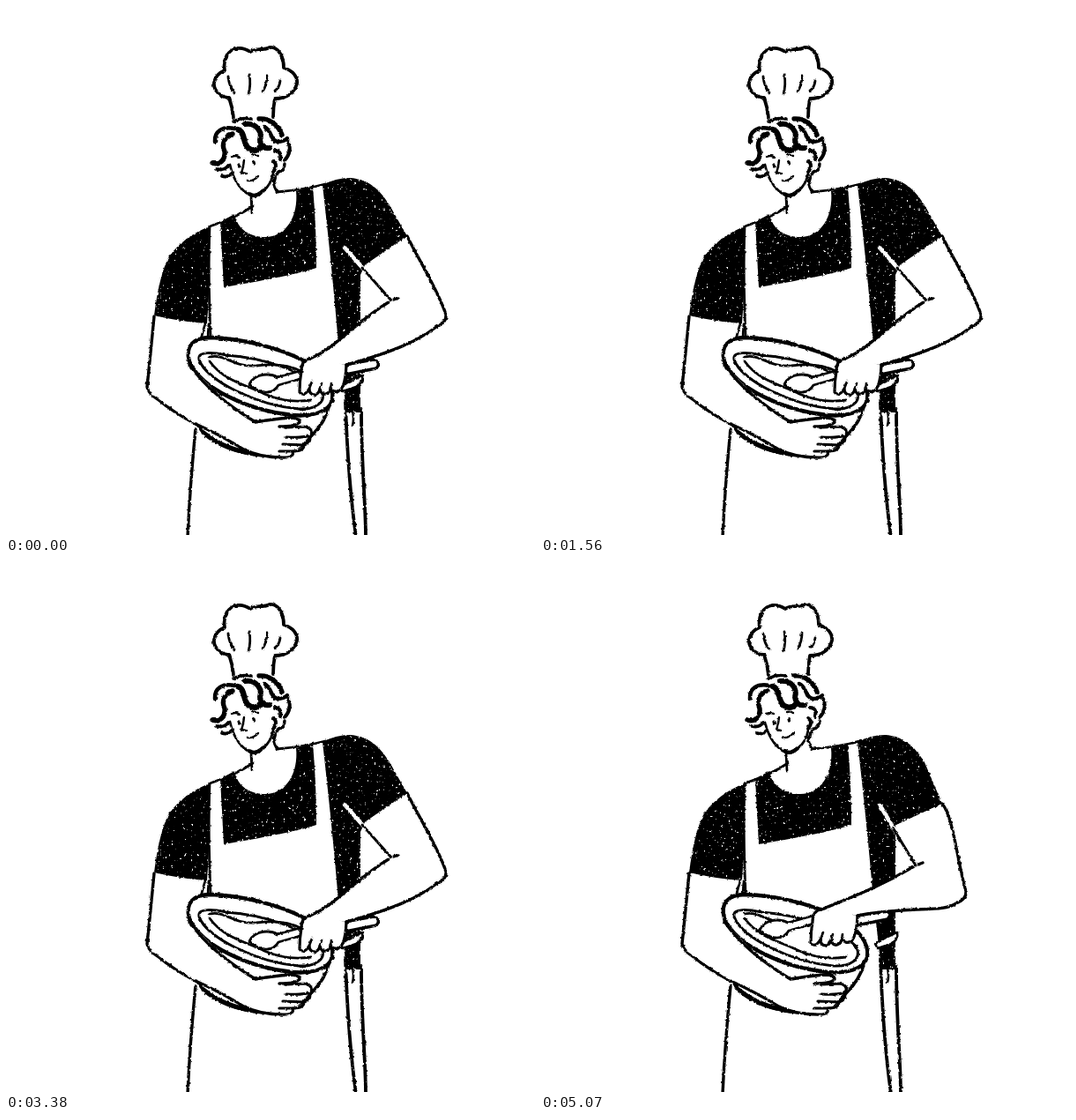
An HTML page that plays this animation: 600 by 600 pixels, repeating every 5.2 s.

```html
<!DOCTYPE html>
<html lang="en">
<head>
<meta charset="utf-8">
<title>Cook stirring a bowl</title>
<style>
html, body { margin: 0; width: 100%; height: 100%; overflow: hidden; background: #fff; }
svg { display: block; width: 100%; height: 100%; }
path { stroke-linecap: round; stroke-linejoin: round; }
.pose { visibility: hidden; animation: 520ms step-end infinite; }
.mid { animation-name: mid; }
.out { animation-name: out; }
.in { animation-name: in; }
@keyframes mid { 0%, 50% { visibility: visible; } 25%, 75%, 100% { visibility: hidden; } }
@keyframes out { 0%, 50%, 100% { visibility: hidden; } 25% { visibility: visible; } }
@keyframes in { 0%, 100% { visibility: hidden; } 75% { visibility: visible; } }
</style>
</head>
<body>
<svg id="stage" viewBox="0 0 600 600"></svg>
<script>
// The arm swings about its middle pose: how far each joint travels for a swing of 1.
const reach = { elbow: [-17, 22], crease: [-12, 9], hand: [-27, -7], spoon: [-28, -13], hem: [0, 12] };
const poses = [
  { name: 'mid', seed: 3, swing: 0 },
  { name: 'out', seed: 11, swing: -1.3 },
  { name: 'in', seed: 23, swing: 1 }
];
for (const p of poses)
  for (const joint in reach) p[joint] = reach[joint].map(v => v * p.swing);

const line = (d, w = 3.4) => `<path d="${d}" fill="none" stroke="#000" stroke-width="${w}"/>`;
const shape = (d, w = 3.4) => `<path d="${d}" fill="#fff" stroke="#000" stroke-width="${w}"/>`;
const black = d => `<path d="${d}"/>`;
const white = d => `<path d="${d}" fill="#fff"/>`;
const shift = ([x, y], body) => `<g transform="translate(${x} ${y})">${body}</g>`;
const at = (x, y, [dx, dy], k = 1) => `${x + dx * k} ${y + dy * k} `;

const area = 'filterUnits="userSpaceOnUse" x="0" y="0" width="600" height="600" color-interpolation-filters="sRGB"';
const filters = ({ name, seed }) => `
  <filter id="rough-${name}" ${area}>
    <feTurbulence type="fractalNoise" baseFrequency=".28" numOctaves="2" seed="${seed}"/>
    <feDisplacementMap in="SourceGraphic" scale="2.8" xChannelSelector="R" yChannelSelector="G"/>
  </filter>
  <filter id="grain-${name}" ${area}>
    <feTurbulence type="fractalNoise" baseFrequency=".4 .3" numOctaves="2" seed="${seed + 5}"/>
    <feColorMatrix values="0 0 0 0 0  0 0 0 0 0  0 0 0 0 0  0 0 0 12 -8.4" result="specks"/>
    <feComposite in="SourceGraphic" in2="specks" operator="out"/>
  </filter>`;

const hat = () =>
  line('M258 127 Q257 115 253 104 C244 104 235 96 236 87 Q238 77 248 73 C246 61 251 50 262 48 Q270 47 277 52 C283 47 292 51 299 47 C308 46 315 56 315 70 C325 73 331 80 330 88 C327 99 318 105 305 105 Q303 115 303 126', 3.8) +
  line('M252 80 Q253 91 259 98 M276 78 Q278 89 275 100 M296 79 Q296 90 291 97 M311 85 Q310 93 305 96', 2.8);

const face = () =>
  line('M254 180 Q259 203 274 213 Q282 219 291 211 Q301 202 303 190', 2.8) +
  line('M276 213 Q283 218 292 209', 4.2) +
  line('M256 171 Q260 169 264 171 M279 169 Q283 168 286 170 M270 175 Q269 184 267 189 L272 190 M274 198 Q281 199 286 193', 2.4) +
  line('M264 180 L264.5 182 M281 177 L281.5 179', 3.2) +
  line('M278 217 L279 235 M303 198 Q304 207 308 211', 2.8);

const hair = () =>
  line('M237 154 C236 142 246 136 259 139', 4.6) +
  line('M234 178 C243 181 249 174 248 165 C244 157 248 147 257 145', 5.4) +
  line('M263 140 C272 143 268 157 276 162 Q283 166 288 161', 6.4) +
  line('M271 134 C284 132 291 143 288 152 Q290 163 299 161', 6) +
  line('M258 131 Q267 126 278 128', 3.6) +
  line('M287 128 C300 127 309 136 313 146', 5.4) +
  line('M293 137 C302 141 299 152 308 154 Q315 154 319 150', 4.4) +
  line('M320 154 Q325 165 316 175 M305 164 Q313 164 311 174 M303 176 Q309 180 303 188', 4) +
  line('M316 179 Q316 187 309 188 Q305 193 304 200', 3.4) +
  line('M239 185 Q248 187 252 181 M245 193 Q251 195 256 190', 3.8);

const shirt = ({ name, hem, crease }) => `<g filter="url(#grain-${name})">` +
  black('M231 250 Q202 261 185 284 Q174 304 168 351 Q197 358 228 360 Q232 310 231 250Z') +
  black('M243 245 L259 236 C263 254 277 262 294 262 C317 262 332 239 329 210 L348 205 Q352 250 352 297 Q330 305 247 319Z') +
  black('M359 203 Q374 195 390 195 C411 196 424 208 435 226 L' + at(455, 261, hem) + 'L' + at(407, 294, crease, .4) +
    'L402 305 L402 461 L386 461 L376 372 Q370 300 359 203Z') + '</g>';

const apron = () =>
  line('M280 227 Q261 240 231 250 M307 211 Q340 208 362 202 M231 250 Q229 300 232 375', 2.8) +
  line('M215 480 Q209 540 206 602', 3.4) +
  line('M385 450 C387 510 391 560 397 602 M403 458 C403 520 408 565 408 602', 3.8) +
  line('M393 460 Q395 468 393 476', 2.6) +
  shape('M379 432 Q391 424 404 419 Q406 427 397 432 L382 437Z', 2.6);

const leftArm = () =>
  line('M168 352 Q164 394 160 432 Q161 439 172 446 Q190 461 215 474') +
  line('M226 360 L221 378 M230 361 L229 375', 2.8);

const bowl = ({ spoon }) =>
  shape('M208 405 C213 444 214 476 224 484 Q247 506 292 510 Q330 510 346 488 C356 478 363 468 366 455', 3.6) +
  line('M224 484 Q247 503 283 508', 5) +
  shape('M208 403 C203 386 212 376 232 376 C264 377 306 386 337 402 C359 414 373 431 370 447 C366 461 346 466 325 464 C275 459 221 434 208 403Z', 4.4) +
  shape('M219 401 C217 391 235 393 250 396 C291 399 340 414 358 436 C364 450 350 458 332 457 C285 453 227 425 219 401Z', 3) +
  line('M231 398 C249 394 257 410 284 408 Q315 404 334 414', 2.8) +
  line('M231 403 C247 426 277 431 293 440 Q318 451 346 447', 2.8) +
  shift(spoon, shape('M276 429 C283 415 301 417 308 421 L337 413 L337 422 L309 430 C303 441 288 441 276 429Z', 2.8));

const leftHand = () =>
  white('M209 408 L240 440 L283 472 L328 467 L347 483 L325 511 L285 509 L218 476 L165 440Z') +
  line('M209 408 Q232 441 283 472 Q300 469 321 467 Q333 467 333 472 Q329 477 310 477') +
  line('M215 474 Q240 485 270 503 Q290 513 319 512 Q327 511 325 505 M318 478 L340 477 Q349 480 345 487 Q338 490 318 489 M344 488 Q347 495 338 498 L314 497 M338 498 Q338 505 325 505 L310 505', 3.2);

const rightArm = ({ elbow, crease, hand, hem }) => {
  const outer = 'M' + at(455, 261, hem) + 'C468 288 ' + at(490, 322, elbow) + at(499, 350, elbow) +
    'Q' + at(500, 359, elbow) + at(488, 364, elbow) +
    'C' + at(467, 380, elbow, .8) + at(440, 392, hand, .6) + at(386, 407, hand);
  const top = at(345, 400, hand) + 'C' + at(376, 387, hand) + at(392, 361, crease) + at(437, 334, crease);
  const corner = at(407, 294, crease, .4);
  const tip = at(437, 334, crease);
  const fingers = 'M345 400 Q335 401 335 414 Q333 425 333 438 Q338 444 344 434 Q344 441 350 441 Q355 440 356 434 Q357 441 363 440 Q368 438 368 433 Q372 440 379 436 Q385 430 386 407';
  return shift(hand, shape('M378 408 L417 401 Q426 404 420 411 L380 419Z')) +
    white(outer + 'L' + top + 'L' + corner + 'Z') +
    shift(hand, white(fingers + 'Z') + line(fingers, 3.2) + line('M344 434 L347 426 M356 434 L358 428 M368 433 L369 428', 2.6)) +
    line(outer) +
    line('M' + top + 'L' + at(445, 331, crease)) +
    `<path d="M384 274 L${tip}" fill="none" stroke="#fff" stroke-width="4.5"/>` +
    line('M' + at(404, 297, crease, .4) + 'L' + tip, 3);
};

const scene = p => `<g class="pose ${p.name}"><g filter="url(#rough-${p.name})">` +
  hat() + face() + hair() + shirt(p) + apron() + leftArm() + bowl(p) + leftHand() + rightArm(p) + '</g></g>';

document.getElementById('stage').innerHTML =
  '<defs>' + poses.map(filters).join('') + '</defs>' + poses.map(scene).join('');
</script>
</body>
</html>
```
